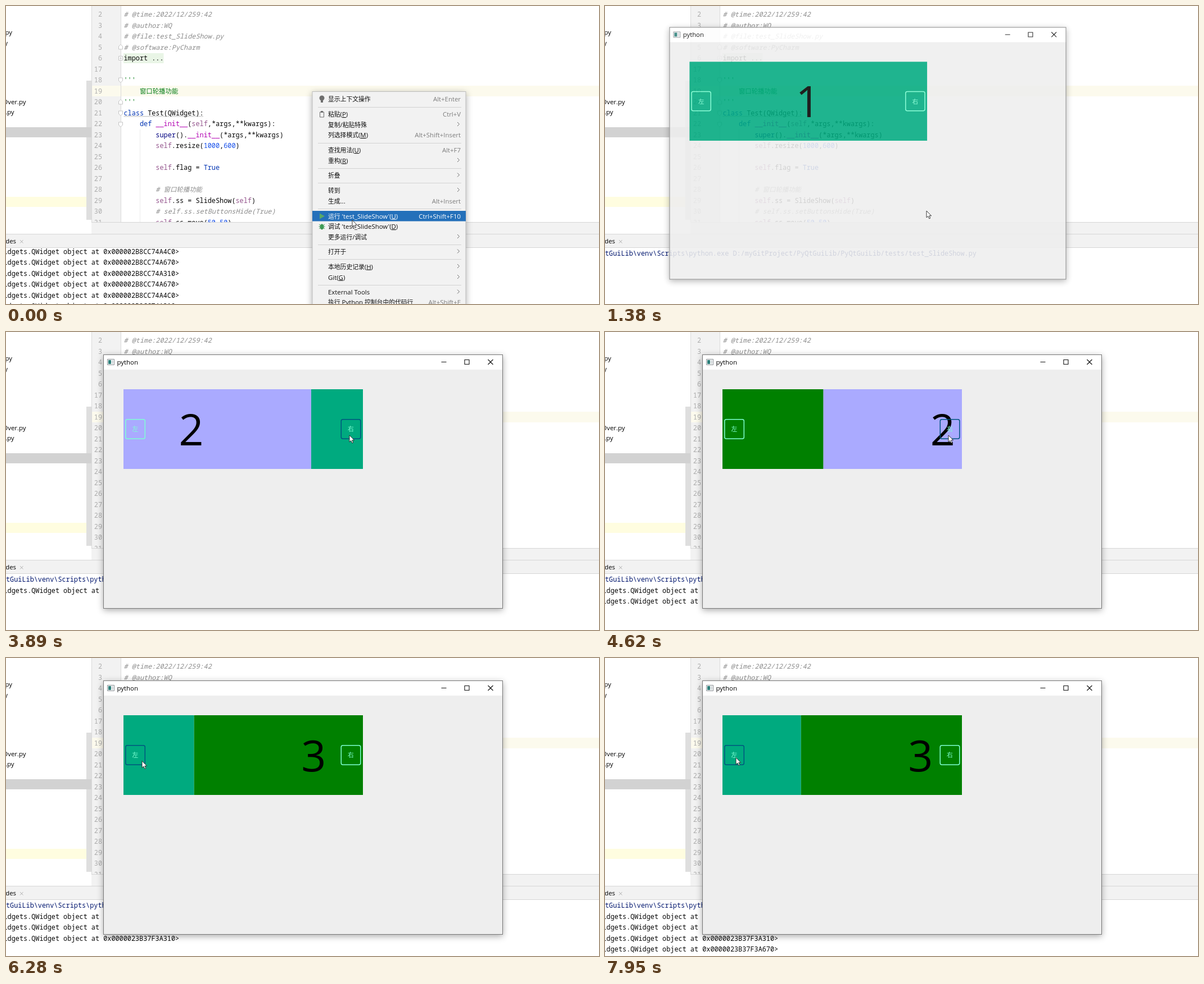
Animation of 1055 by 531 pixels, one loop 7990 ms. Source, as an HTML page:

```html
<!DOCTYPE html>
<html lang="zh">
<head>
<meta charset="utf-8">
<title>Slide show demo</title>
<style>
html, body { margin: 0; width: 100%; height: 100%; overflow: hidden; background: #fff; }
svg { display: block; }
text { white-space: pre; font: 11.4px 'Open Sans', 'Noto Sans CJK SC', 'Noto Sans CJK', sans-serif; }
.code { font: 11.85px 'Noto Sans Mono', 'DejaVu Sans Mono', 'Noto Sans CJK SC', monospace; fill: #080808; }
.cjk { font-size: 10.8px; font-family: 'Noto Sans CJK SC', 'Noto Sans CJK', sans-serif; }
.code .cjk { font-size: 11.4px; }
.comment { fill: #8c8c8c; font-style: italic; }
.key { fill: #0033b3; } .self { fill: #94558d; } .magic { fill: #b200b2; }
.builtin { fill: #000080; } .num { fill: #1750eb; } .doc { fill: #067d17; }
.no { fill: #adadad; } .end { text-anchor: end; } .mid { text-anchor: middle; }
.digit { font-size: 77px; }
.shadow { filter: drop-shadow(0 3px 6px rgba(0,0,0,.33)); }
</style>
</head>
<body>
<svg id="stage" width="1055" height="531" viewBox="0 0 1055 531">
  <defs>
    <clipPath id="editorClip"><rect width="1055" height="385"/></clipPath>
    <clipPath id="slideClip"><rect x="36" y="62" width="426" height="142"/></clipPath>
  </defs>
  <rect width="1055" height="531" fill="#fff"/>
  <g id="editor" clip-path="url(#editorClip)"></g>
  <g id="panels"></g>
  <g id="oldOutput"></g>
  <g id="newOutput"></g>
  <g id="menu"></g>
  <g id="window">
    <rect class="shadow" width="711" height="453" fill="#eee"/>
    <rect width="711" height="27" fill="#fff"/>
    <rect x=".5" y=".5" width="710" height="452" fill="none" stroke="#777"/>
    <path d="M7.5 8.5h12v10h-12z" fill="#fff" stroke="#8a8f94"/>
    <path d="M9 10h5v7h-5z" fill="#2d7f7a"/><path d="M15 10h3v7h-3z" fill="#d5dadd"/>
    <text x="24.5" y="17.5">python</text>
    <path d="M601.5 13.5h9M643 9.5h8v8h-8zM684.5 9l9 9m0-9l-9 9" fill="none" stroke="#111" stroke-width="1.1"/>
    <g id="slides" clip-path="url(#slideClip)"></g>
    <g id="buttons"></g>
  </g>
  <path id="cursor" d="M0 0v12l2.8-2.5 2 4.4 2-.9-2-4.2h3.8z" fill="#fff" stroke="#222" stroke-width=".9"/>
</svg>
<script>
const LOOP = 7990;
const el = id => document.getElementById(id);
const rect = (x, y, w, h, fill) => `<rect x="${x}" y="${y}" width="${w}" height="${h}" fill="${fill}"/>`;
const path = (d, stroke, fill = 'none') => `<path d="${d}" stroke="${stroke}" fill="${fill}"/>`;
const wrapCjk = s => String(s).replace(/[\u4e00-\u9fff]+/g, '<tspan class="cjk">$&</tspan>');
const text = (x, y, s, cls = '', extra = '') =>
  `<text x="${x}" y="${y}" class="${cls}" ${extra}>${wrapCjk(s)}</text>`;

// Editor
const codeLines = [
  [2, '# @time:2022/12/259:42'], [3, '# @author:WQ'], [4, '# @file:test_SlideShow.py'],
  [5, '# @software:PyCharm'], [6, 'import ...'], [17, ''], [18, "'''"], [19, '    窗口轮播功能'],
  [20, "'''"], [21, 'class Test(QWidget):'], [22, '    def __init__(self,*args,**kwargs):'],
  [23, '        super().__init__(*args,**kwargs)'], [24, '        self.resize(1000,600)'], [25, ''],
  [26, '        self.flag = True'], [27, ''], [28, '        # 窗口轮播功能'],
  [29, '        self.ss = SlideShow(self)'], [30, '        # self.ss.setButtonsHide(True)'],
  [31, '        self.ss.move(50,50)']
];
const tokens = { class: 'key', def: 'key', True: 'key', self: 'self', __init__: 'magic', super: 'builtin' };
const highlight = s => s.replace(/\b(class|def|True|self|__init__|super|\d+)\b/g,
  t => `<tspan class="${tokens[t] || 'num'}">${t}</tspan>`);

function codeLine([no, s], row) {
  const y = 19.2 + row * 19.5;
  const number = text(171, y, no, 'code no end');
  if (s.trim().startsWith('#')) return number + text(209.5, y, s, 'code comment');
  if (no >= 18 && no <= 20) return number + text(209.5, y, s, 'code doc');
  return number + text(209.5, y, highlight(s), 'code');
}
const foldMark = (y, up) =>
  path(up ? `M200.5 ${y + 4}v-5l3.5-3.5 3.5 3.5v5z` : `M200.5 ${y - 4}h7v5l-3.5 3.5-3.5-3.5z`, '#c4c4c4', '#fff');

el('editor').innerHTML =
  rect(152, 0, 52, 385, '#f2f2f2') + rect(152, 142, 903, 19, '#fcfaed') +
  rect(209, 84, 71.5, 18, '#e9f5e6') +
  path('M152.5 0V385M204.5 0V385', '#dadada') + path('M238.5 220V385', '#ececec') +
  path('M209.5 196.8H351', '#b9b9b9') +
  codeLines.map(codeLine).join('') +
  foldMark(73, true) + path('M200.5 89.5h7v7h-7zM202 93h4M204 91v4', '#c4c4c4', '#fff') +
  foldMark(132) + foldMark(171, true) + foldMark(191) + foldMark(211);

// Project tree, bars and console tab
el('panels').innerHTML =
  rect(0, 340, 152, 18, '#fffde0') + rect(143, 133, 9, 248, '#dedede') +
  rect(0, 216, 152, 18, '#d2d2d2') +
  text(11, 51, 'py', 'end') + text(3, 70, 'y', 'end') +
  text(35.5, 175, 'Over.py', 'end') + text(14.5, 193, '.py', 'end') +
  rect(152, 385, 903, 21, '#f2f2f2') + rect(0, 406, 1055, 25, '#f2f2f2') +
  path('M152 385.5H1055M0 406.5H1055M0 430.5H1055', '#d6d6d6') +
  text(18, 423, 'des', 'end') + path('M25 417l5.5 5.5m0-5.5l-5.5 5.5', '#b0b0b0');

// Console
const objectLine = (y, address) =>
  text(-11.6, y, `Widgets.QWidget object at 0x${address}&gt;`, 'code');
el('oldOutput').innerHTML = ['4C0', '670', '310', '670', '4C0', '310']
  .map((tail, i) => objectLine(441.7 + i * 19.5, '000002B8CC74A' + tail)).join('');
el('newOutput').innerHTML =
  text(0, 445.2, 'tGuiLib\\venv\\Scripts\\python.exe D:/myGitProject/PyQtGuiLib/PyQtGuiLib/tests/test_SlideShow.py',
    'code', 'style="fill:#00166e"') +
  ['4C0', '670', '310', '670'].map((tail, i) => objectLine(464.7 + i * 19.5, '0000023B37F3A' + tail)).join('');
const outputLines = [...el('newOutput').children].slice(1);

// Context menu; '>' marks a submenu
const menuItems = [
  [166, '显示上下文操作', 'Alt+Enter'], [193, '粘贴(P)', 'Ctrl+V'], [211.5, '复制/粘贴特殊', '>'],
  [230, '列选择模式(M)', 'Alt+Shift+Insert'], [257, '查找用法(U)', 'Alt+F7'], [275.5, '重构(R)', '>'],
  [302, '折叠', '>'], [328.5, '转到', '>'], [347.5, '生成...', 'Alt+Insert'],
  [374.5, "运行 'test_SlideShow'(U)", 'Ctrl+Shift+F10'], [393, "调试 'test_SlideShow'(D)", ''],
  [411.5, '更多运行/调试', '>'], [438, '打开于', '>'], [464.5, '本地历史记录(H)', '>'], [483.5, 'Git(G)', '>'],
  [510, 'External Tools', '>'], [528, '执行 Python 控制台中的代码行', 'Alt+Shift+E']
];
function menuItem([y, label, hint]) {
  const active = hint === 'Ctrl+Shift+F10';
  const fill = color => `fill="${active ? '#fff' : color}"`;
  const name = label.replace(/\((\w)\)$/, '(<tspan text-decoration="underline">$1</tspan>)');
  return (active ? rect(545, 365, 273, 18.5, '#2470ba') : '') +
    text(573, y + 4, name, '', fill('#111')) +
    (hint === '>' ? path(`M803 ${y - 4.5}l3.5 3.5-3.5 3.5`, '#6e6e6e')
      : text(809, y + 4, hint, 'end', fill('#7d7d7d')));
}
el('menu').innerHTML =
  '<rect class="shadow" x="545" y="152.5" width="273" height="390" fill="#f2f2f2" stroke="#bdbdbd"/>' +
  [180, 244, 289, 315, 361, 425, 451, 497].map(y => path(`M555 ${y + .5}H810`, '#d2d2d2')).join('') +
  menuItems.map(menuItem).join('') +
  '<circle cx="562" cy="164" r="4.5" fill="#6e6e6e"/>' + rect(560, 167, 4, 5, '#6e6e6e') +
  path('M558.5 189h7v9h-7z', '#6e6e6e') + rect(560, 187, 4, 3, '#6e6e6e') +
  path('M558 369.5l9 5-9 5z', 'none', '#59a869') +
  path('M557 389l10 8M567 389l-10 8M556.5 393h11', '#3f9a55') +
  '<ellipse cx="562" cy="393.5" rx="3.5" ry="5" fill="#3f9a55"/>';

// Slides and buttons, in window coordinates
const slideWidth = 426;
el('slides').innerHTML = ['#00aa7f', '#aaaaff', '#008000'].map((color, i) =>
  `<g>${rect(36, 62, slideWidth, 142, color)}${text(248.5, 161.5, i + 1, 'digit mid')}</g>`).join('');
const slides = [...el('slides').children];

const buttonX = [39.5, 423];
el('buttons').innerHTML = buttonX.map((x, i) =>
  `<rect x="${x + .3}" y="115.8" width="34.5" height="34.5" rx="3" fill="none" stroke-width="1.5"/>` +
  text(x + 17.5, 137.2, '左右'[i], 'mid', 'fill="#7fffd4"')).join('');
const frames = el('buttons').querySelectorAll('rect');

// Motion: times in ms
const clamp = v => Math.max(0, Math.min(1, v));
const progress = (t, start, duration) => clamp((t - start) / duration);
const smooth = p => p * p * (3 - 2 * p);

// start, leaving slide, entering slide, direction of travel
const turns = [[3107, 0, 1, 1], [4200, 1, 2, 1], [5986, 2, 0, 1], [7279, 0, 2, -1]];

const cursorKeys = [
  [0, 616, 381.5], [560, 616, 381.5], [1200, 572, 365], [1420, 572, 365], [2020, 420, 49],
  [2150, 420, 49], [2520, 481, 53], [2880, 611, 184], [5080, 611, 184], [5350, 353, 190.5],
  [5620, 242, 183.5], [6990, 242, 183.5], [7130, 233, 177.5], [LOOP, 233, 177.5]
];
function cursorAt(t) {
  const i = cursorKeys.findIndex(k => k[0] > t);
  const [t0, x0, y0] = cursorKeys[i - 1], [t1, x1, y1] = cursorKeys[i];
  const p = smooth(progress(t, t0, t1 - t0));
  return [x0 + (x1 - x0) * p, y0 + (y1 - y0) * p];
}

const show = (node, on) => node.setAttribute('visibility', on ? 'visible' : 'hidden');

function placeSlides(t) {
  const [start, from, to, dir] = turns.filter(turn => turn[0] <= t).pop() || [0, 0, 0, 0];
  const p = progress(t, start, 1000);
  slides.forEach((slide, i) => {
    show(slide, i === from || i === to);
    const offset = (i === to ? p - 1 : p) * dir;
    slide.setAttribute('transform', `translate(${offset * slideWidth})`);
  });
}

function draw(t) {
  show(el('menu'), t < 490);
  show(el('oldOutput'), t < 570);
  el('newOutput').style.display = t < 570 ? 'none' : '';
  outputLines.forEach((line, i) => show(line, t >= turns[i][0]));

  const opened = 1 - (1 - progress(t, 1226, 240)) ** 2;
  const dragged = smooth(progress(t, 2150, 370));
  const x = 112 + 61 * dragged, y = 36 + 4 * dragged, scale = .945 + .055 * opened;
  el('window').setAttribute('opacity', opened);
  el('window').setAttribute('transform',
    `translate(${x + 355.5} ${y + 226.5}) scale(${scale}) translate(-355.5 -226.5)`);
  placeSlides(t);

  const [cx, cy] = cursorAt(t);
  el('cursor').setAttribute('transform', `translate(${cx} ${cy})`);
  frames.forEach((frame, i) => {
    const dx = cx - x - buttonX[i], dy = cy - y - 115.5;
    const hover = dx >= 0 && dx <= 35 && dy >= 0 && dy <= 35;
    frame.setAttribute('stroke', hover ? '#00557f' : '#7fffd4');
  });
}

const began = performance.now();
function tick() {
  draw((performance.now() - began) % LOOP);
  requestAnimationFrame(tick);
}
draw(0);
requestAnimationFrame(tick);
</script>
</body>
</html>
```
